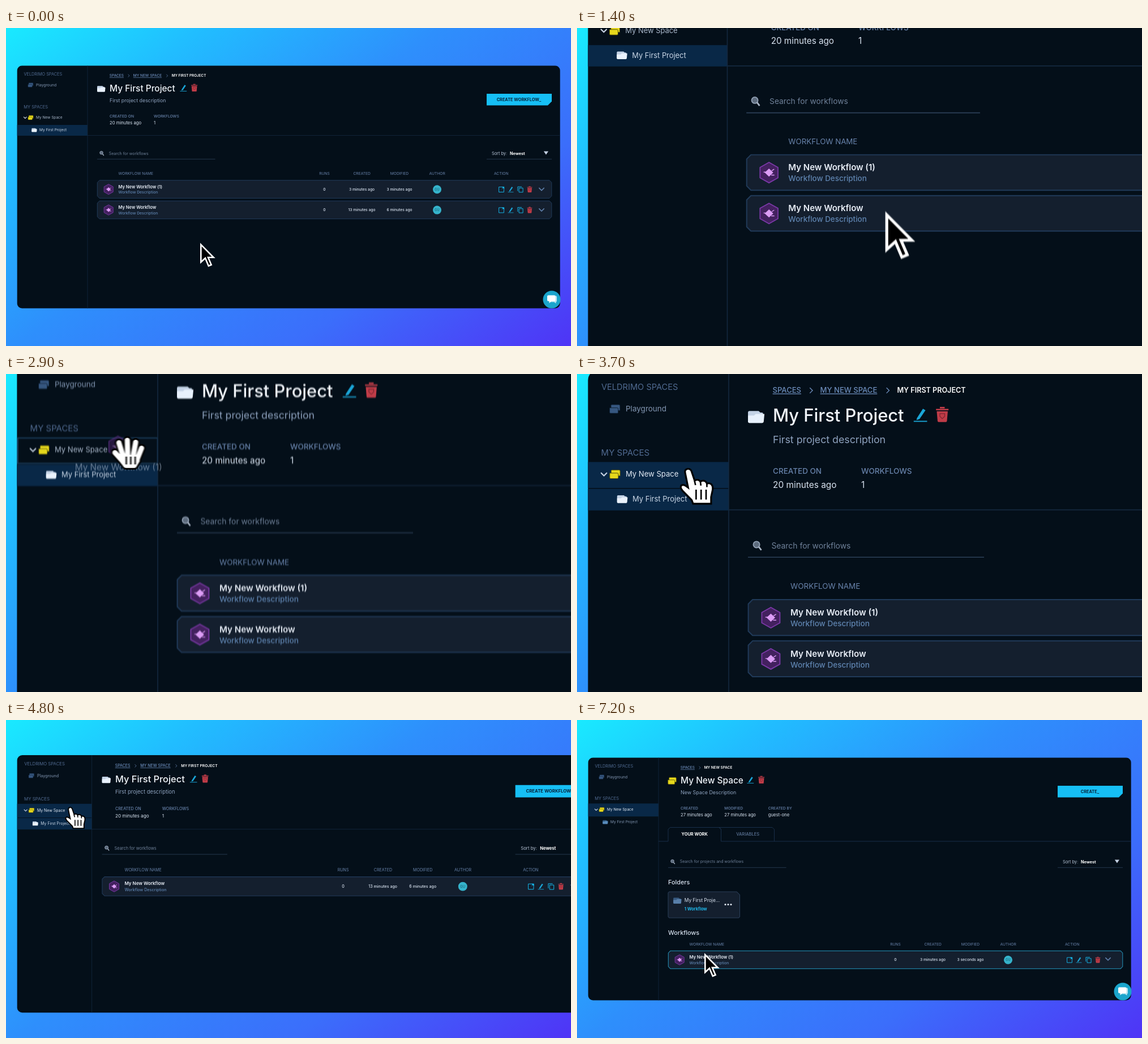
An HTML page that plays this animation: 998x561 px, repeating every 7.3 s.

```html
<!DOCTYPE html>
<html lang="en">
<head>
<meta charset="utf-8">
<title>Move a workflow</title>
<style>
html, body { margin: 0; width: 100%; height: 100%; overflow: hidden; background: #2e8ffd; }
svg { display: block; width: 998px; height: 561px; }
text { font-family: Inter, "Open Sans", sans-serif; white-space: pre; }
</style>
</head>
<body>
<svg id="stage" viewBox="0 0 998 561" xmlns="http://www.w3.org/2000/svg"></svg>
<script>
const LOOP = 7300, STEP = 100;
const LABEL = '#6883ab', SOFT = '#8fa3bf', LIGHT = '#d9e3f0', CYAN = '#16bff5', RED = '#c03c48', LINE = '#14283f';

// ---- drawing helpers; y is the middle of the capitals ----
const text = (x, y, size, fill, str, o = {}) =>
  `<text x="${x}" y="${(y + size * 0.36).toFixed(2)}" font-size="${size}" fill="${fill}" font-weight="${o.w || 400}"` +
  ` text-anchor="${o.a || 'start'}"${o.id ? ` id="${o.id}"` : ''}${o.u ? ' text-decoration="underline"' : ''}>${str}</text>`;
const path = (d, fill, stroke = 'none', w = 1, more = '') =>
  `<path d="${d}" fill="${fill}" stroke="${stroke}" stroke-width="${w}" ${more}/>`;
const rect = (x, y, w, h, fill, more = '') =>
  `<rect x="${x}" y="${y}" width="${w}" height="${h}" fill="${fill}" ${more}/>`;
const at = (x, y, body, k = 1, id = '') =>
  `<g${id ? ` id="${id}"` : ''} transform="translate(${x} ${y}) scale(${k})">${body}</g>`;
const group = (id, body) => `<g id="${id}">${body}</g>`;
const hline = (x1, x2, y, c = LINE) => path(`M${x1} ${y}H${x2}`, 'none', c, 0.8);

// ---- icons, centred on 0,0 ----
const stack = (c, edge) =>
  path('M-2.8 -3.8H3.6Q4.6 -3.8 4.6 -2.8V1.4H-3.4V-3.2Z', c, edge, 0.45) +
  path('M-4.6 -1H2Q3 -1 3 0V3Q3 3.8 2.2 3.8H-3.8Q-4.6 3.8 -4.6 3Z', c, edge, 0.45);
const folder = (back, front) =>
  path('M-4.6 -2.4Q-4.6 -3.3 -3.8 -3.3H1.4L2.4 -2.4H3.2Q4 -2.4 4 -1.6V3H-4.6Z', back) +
  path('M-4.6 -.7H-1.2L-.2 -1.6H4.7L4.3 2.7Q4.2 3.5 3.4 3.5H-3.8Q-4.6 3.5 -4.6 2.7Z', front);
const pencil =
  path('M-3 2.7L2.2 -5.4L4.4 -4L-.8 3.6L-3.4 4.4Z', '#1aa6d8') +
  path('M-5.8 5.5H5.8', 'none', '#1aa6d8', 0.9);
const trash =
  path('M-5.2 -4.2H5.2M-2 -5.8H2', 'none', RED, 1.2) +
  path('M-4.6 -2.8H4.6L3.9 5.4Q3.8 6.2 3 6.2H-3Q-3.8 6.2 -3.9 5.4Z', RED) +
  path('M-2 -.8H2V1.4L0 3.4L-2 1.4Z', 'none', '#7c2630', 0.6);
const openIcon =
  path('M1 -4.4H-4.4V4.6H4.4V-.6', 'none', CYAN, 0.9) + path('M1 -4.6H4.8V-.8ZM.8 -.8L2.8 -2.6', CYAN, CYAN, 0.6);
const copy =
  path('M-2.4 -2.6H4.6V4.8H-2.4Z', 'none', CYAN, 0.9, 'stroke-linejoin="round"') +
  path('M-4.6 2.8V-4.8H2.6', 'none', CYAN, 0.9);
const chevron = (c, w = 1.2) => path('M-2 -1L0 1L2 -1', 'none', c, w, 'stroke-linecap="round"');
const lens =
  '<circle cx="-.6" cy="-.8" r="2.5" fill="#5d6b7d" stroke="#93a2b6" stroke-width=".8"/>' +
  path('M1.2 1L3.2 3.6', 'none', '#aab6c6', 1.2);
const hexagon =
  path('M0 -9.1L8 -4.6V4.6L0 9.1L-8 4.6V-4.6Z', '#43215f', '#7c38a8', 0.9) +
  path('M0 -3.6L3.8 0L0 3.6L-3.8 0Z', '#dc9cf5') +
  path('M-4.8 -.4H-2M2 2.2H4.8M2.4 -1.6L4.6 -3', 'none', '#dc9cf5', 0.7);

// ---- page parts ----
const box = (x, y, w, h, c) =>
  `M${x + c} ${y}H${x + w - c}L${x + w} ${y + c}V${y + h - c}L${x + w - c} ${y + h}H${x + c}L${x} ${y + h - c}V${y + c}Z`;

function row(id, y, name, made, changed, dx = 0) {
  const small = { a: 'middle', w: 500 };
  return at(0, y,
    path(box(161.3, 0.2, 802.5, 31.6, 3.8), '#141f2e', '#203a59', 1, `id="${id}Edge" stroke-linejoin="round"`) +
    at(181.2, 16.1, hexagon) +
    text(198.5, 11.4, 7.56, '#e8eef7', name, { w: 600 }) +
    text(198.5, 21.3, 6.78, '#5f84b0', 'Workflow Description', { w: 500 }) +
    text(562.5, 16, 6.7, LIGHT, '0', small) +
    text(628.5, 16, 6.7, LIGHT, made, small) +
    text(695, 16, 6.7, LIGHT, changed, { ...small, id: id + 'Time' }) +
    '<circle cx="761.5" cy="16.2" r="7.5" fill="#35b3cb"/>' +
    text(761.5, 16.3, 5.6, '#14566a', 'GU', { a: 'middle' }) +
    at(875 + dx, 16.4, openIcon) + at(891.5 + dx, 16.2, pencil, 0.86) +
    at(908.5 + dx, 16.4, copy) + at(925 + dx, 16.2, trash, 0.86) +
    at(946 + dx * 1.6, 16 + dx * 0.25, chevron('#5d7ca6', 0.8), 2.1), 1, id);
}

const heads = y =>
  text(198.5, y, 6.72, LABEL, 'WORKFLOW NAME') +
  [[562.5, 'RUNS'], [628.7, 'CREATED'], [695, 'MODIFIED'], [761.7, 'AUTHOR'], [874.7, 'ACTION']]
    .map(([x, s]) => text(x, y, 6.7, LABEL, s, { a: 'middle' })).join('');

const tools = (y, hint) =>
  at(169.2, y, lens, 1.12) + text(181.7, y, 6.95, '#6f8199', hint) + hline(161, 369.5, y + 10.3, '#2c4058') +
  text(858, y, 7.35, '#b7c4d6', 'Sort by:') + text(890, y, 7.2, '#fff', 'Newest', { w: 700 }) +
  path(`M949.8 ${y - 3.4}H958L953.9 ${y + 2.6}Z`, '#c3d0e2') + hline(849, 964, y + 10.3, '#2c4058');

const crumb = (x, s) => text(x, 84, 6.52, '#6c8cba', s, { w: 500, u: true });
const sep = x => path(`M${x - 1.2} 81.8L${x + 1.2} 84.2L${x - 1.2} 86.6`, 'none', '#6c8cba', 0.7);
const meta = (x, label, value) =>
  text(x, 155.4, 6.75, LABEL, label, { w: 500 }) + text(x, 167.2, 7.7, LIGHT, value);
const title = (name, desc, x) =>
  text(183, 106, 15.43, '#f1f5fa', name, { w: 500 }) + text(183, 127.5, 8.88, SOFT, desc) +
  at(x, 105.8, pencil, 1.02) + at(x + 19.3, 105.5, trash, 1.06);
const button = label =>
  path('M849 116H964V129.5L957 136.5H849Z', CYAN) +
  text(906, 126.2, 7.35, '#06243c', label, { w: 700, a: 'middle' });

const sidebar =
  rect(19, 147.3, 125, 22.9, '#092847', 'id="spaceBg"') +
  rect(20.4, 147.6, 123.4, 22.4, 'none', 'id="dropEdge" stroke="#1c4263" stroke-width=".9"') +
  rect(19, 171, 125, 19, '#092847', 'id="projBg"') +
  path('M144 66V495', 'none', LINE, 0.8) +
  text(31.5, 81, 7.3, '#506a90', 'VELDRIMO SPACES') +
  at(43.4, 100.5, stack('#365780', '#0c1c2e')) + text(53, 100.3, 6.75, '#8296b2', 'Playground') +
  text(31.3, 138.8, 7.5, '#506a90', 'MY SPACES') +
  at(33.8, 158.2, chevron('#c7d3e3', 0.9), 1.2) + at(43.5, 158.1, stack('#e6d81c', '#4a4608')) +
  text(53, 158, 6.53, '#a9b7ca', 'My New Space', { id: 'spaceText' }) +
  group('projOpen', at(50, 180, folder('#c4d3e6', '#eaf2fc'))) +
  group('projShut', at(50, 180, folder('#2f577f', '#5a8dbd'))) +
  text(59, 180, 6.5, '#c9d6e6', 'My First Project', { id: 'projText' });

const projectPage =
  crumb(182.8, 'SPACES') + sep(216.8) + crumb(224.8, 'MY NEW SPACE') + sep(284.5) +
  text(292.7, 84, 6.32, '#fff', 'MY FIRST PROJECT', { w: 600 }) +
  at(168.2, 107.4, folder('#c4d3e6', '#e8f1fc'), 1.56) +
  title('My First Project', 'First project description', 313.3) +
  meta(183, 'CREATED ON', '20 minutes ago') + meta(261, 'WORKFLOWS', '1') +
  button('CREATE WORKFLOW_') + hline(144, 978.5, 189.5) +
  tools(221, 'Search for workflows') + heads(257) +
  row('copyRow', 268.5, 'My New Workflow (1)', '3 minutes ago', '3 minutes ago') +
  row('baseRow', 304.9, 'My New Workflow', '13 minutes ago', '6 minutes ago');

const spacePage =
  crumb(182.8, 'SPACES') + sep(216.8) + text(224.7, 84, 6.4, '#fff', 'MY NEW SPACE', { w: 600 }) +
  at(168, 107.3, stack('#e6d81c', '#4a4608'), 1.6) +
  title('My New Space', 'New Space Description', 306.3) +
  meta(183, 'CREATED', '27 minutes ago') + meta(260.3, 'MODIFIED', '27 minutes ago') +
  meta(337.8, 'CREATED BY', 'guest-one') + button('CREATE_') +
  path('M144 214H161V193L164.5 189.5H251L254.5 193V214H978.5M254.5 193L251 189.5H345L348.5 193V214', 'none', '#1b3350', 0.9) +
  text(207.7, 201.8, 7.4, '#fff', 'YOUR WORK', { w: 700, a: 'middle' }) +
  text(301.7, 201.8, 7.5, '#5d7699', 'VARIABLES', { w: 500, a: 'middle' }) +
  tools(250, 'Search for projects and workflows') +
  text(161, 286.6, 10.8, LIGHT, 'Folders', { w: 500 }) +
  path('M163 303H282L287.5 308.5V347L285.5 349H163L161 347V305Z', '#141f2e', '#2b3f59', 1) +
  at(177.3, 318.6, folder('#36597f', '#587fa9'), 1.55) +
  text(189.8, 318, 8.45, LIGHT, 'My First Proje...') +
  text(189.8, 333.6, 7.4, '#1fb6e8', '1 Workflow', { w: 700 }) +
  [262, 267, 272].map(x => `<circle cx="${x}" cy="325.6" r="1.5" fill="#e6edf6"/>`).join('') +
  text(161, 375.4, 10.8, LIGHT, 'Workflows', { w: 500 }) + heads(395.5) +
  row('moved', 407, 'My New Workflow (1)', '3 minutes ago', '1 second ago', -5);

const chat =
  '<circle cx="964" cy="479" r="15.5" fill="#1ba5cc"/>' +
  path('M960 472.5H971Q973 472.5 973 474.5V481Q973 483 971.5 483.5V486L968 483.5H960Z', '#b9e4f0') +
  path('M958 471.5H968.5Q970.5 471.5 970.5 473.5V480Q970.5 482 968.5 482H963L959.5 485.5V482H958Q956 482 956 480V473.5Q956 471.5 958 471.5Z', '#fff');

// ---- pointers ----
const arrow = path('M1.3 3.2V34L9 27L14.8 40.8L19.6 38.8L14 25.8H23.6Z', '#000', '#fff', 2.6);
const point =
  path('M-4 3.6Q-4.6 .6 -1.6 -.2Q1.4 -.6 2.5 2.4L5.6 11.6Q7 10.4 9 10.8Q10.8 11.4 11.3 12.6Q13.6 11 15.8 12Q17.4 13 17.8 14.6Q20 13.6 22 15Q24 16.6 23.6 20.6L22 28V34.6H4L2.6 31L-6.6 21.6Q-9.6 18 -7.6 16.2Q-5.4 14.8 -1 18.4Z', '#fff', '#000', 1.8) +
  path('M7 20.5V30.5M12 20.5V30.5M17 20.5V30.5M5.4 11.6L6.4 16M11.3 12.6L11.8 16.5M17.8 14.6V18', 'none', '#000', 1.5);
const fingers = 'M-9 -11L-4 5M-.5 -13.5L0 5M8 -11.5L5 5M14 -5.5L9 7M-13 -1L-4 9';
const palm = 'M-5 4H9.5V7L6.5 12H-2L-5 8Z';
const pass = (c, w) => path(fingers, 'none', c, w, 'stroke-linecap="round"') + path(palm, c, c, w, 'stroke-linejoin="round"');
const grab = pass('#000', 8.6) + pass('#fff', 5.2) + path('M-1.5 3V11M3 3V11M7.5 3V11', 'none', '#000', 1.5);

const blurDef = id =>
  `<filter id="${id}Blur" filterUnits="userSpaceOnUse" x="-60" y="-60" width="1118" height="681" color-interpolation-filters="sRGB"><feGaussianBlur id="${id}Dev" stdDeviation="0"/></filter>`;

document.getElementById('stage').innerHTML =
  `<defs><linearGradient id="sky" gradientUnits="userSpaceOnUse" x1="0" y1="0" x2="627" y2="838">
  <stop offset="0" stop-color="#19eaff"/><stop offset=".2" stop-color="#21bdff"/><stop offset=".44" stop-color="#2e8ffc"/>
  <stop offset=".72" stop-color="#3b6efb"/><stop offset="1" stop-color="#4f34f6"/></linearGradient>
  <clipPath id="frame"><rect x="19.7" y="66.5" width="959" height="428" rx="8.5"/></clipPath>${blurDef('scene')}${blurDef('mouse')}</defs>` +
  rect(0, 0, 998, 561, 'url(#sky)') +
  group('scene', group('cam', '<g clip-path="url(#frame)">' +
    rect(19, 66, 961, 430, '#040f19') + sidebar + group('project', projectPage) + group('space', spacePage) + '</g>' + chat +
    at(0, 0, `<g opacity=".55">${hexagon}</g><g opacity=".6">` +
      text(0.5, 18.2, 7.65, '#a9b8cb', 'My New Workflow (1)', { a: 'middle' }) + '</g>', 1, 'ghost'))) +
  group('mouse', group('cursor', group('arrow', arrow) + group('point', point) + group('grab', grab)));

// ---- motion ----
const $ = id => document.getElementById(id);
const show = (id, on) => $(id).setAttribute('display', on ? 'inline' : 'none');
const clamp = u => Math.max(0, Math.min(1, u));
const ramp = (t, a, b) => { const u = clamp((t - a) / (b - a)); return u * u * (3 - 2 * u); };
const mix = (a, b, u) => a + (b - a) * u;
const spring = ms => { const u = Math.max(0, ms) * 0.006; return 1 - (1 + u) * Math.exp(-u); };

const GRAB = 2050, DROP = 3600, MOVED = 4200, CLICK = 5200, OPEN = 5350;

const zoom = t => 1 + spring(t - 430) - spring(t - 4050);
const focus = t => 314.7 - 176.2 * spring(t - 2450);

// each leg: start, end, target
const legs = [[700, 1900, 250, 283], [GRAB, 3050, 109, 153.5], [6200, 6950, 225, 411]];
const mouse = t => legs.reduce((p, [a, b, x, y]) => {
  const u = ramp(t, a, b);
  return [mix(p[0], x, u), mix(p[1], y, u)];
}, [343, 379]);

const place = (t, [x, y]) => {
  const s = zoom(t);
  return [20 + (x - 20) * s, y * s - focus(t) * (s - 1)];
};

function blur(id, x, y) {
  const on = x > 0.2 || y > 0.2;
  if (on) {
    $(id + 'Dev').setAttribute('stdDeviation', `${x.toFixed(2)} ${y.toFixed(2)}`);
    $(id).setAttribute('filter', `url(#${id}Blur)`);
  } else $(id).removeAttribute('filter');
}

function draw(t) {
  const s = zoom(t), [mx, my] = mouse(t), before = t - 20;
  const drag = t >= GRAB && t < DROP, opened = t >= OPEN;

  $('cam').setAttribute('transform', `translate(${20 - 20 * s} ${-focus(t) * (s - 1)}) scale(${s})`);
  const dz = Math.abs(s - zoom(before)) * 50;
  const pan = Math.abs(focus(t) - focus(before)) * 50 * (s - 1);
  blur('scene', dz, pan * 0.005 + dz * 0.3);

  show('project', !opened);
  show('space', opened);
  show('copyRow', t < MOVED);
  $('baseRow').setAttribute('transform', `translate(0 ${t < MOVED ? 304.9 : 268.5})`);

  const hover = opened && my > 407;
  $('movedEdge').setAttribute('stroke', hover ? '#2596bd' : '#203a59');
  $('movedTime').textContent = t < 6100 ? '1 second ago' : t < 7100 ? '2 seconds ago' : '3 seconds ago';

  show('spaceBg', t >= DROP);
  show('dropEdge', drag && my > 147 && my < 170);
  show('projBg', !opened);
  show('projOpen', !opened);
  show('projShut', opened);
  $('spaceText').setAttribute('fill', t >= DROP ? '#e3ebf5' : '#a9b7ca');
  $('projText').setAttribute('fill', opened ? '#8397b3' : '#c9d6e6');

  show('ghost', drag);
  $('ghost').setAttribute('transform', `translate(${mx - 8.7} ${my - 6.2})`);

  const hand = t >= DROP && my < 190;
  show('grab', drag);
  show('point', hand);
  show('arrow', !drag && !hand);
  const press = ramp(t, 1900, GRAB) - ramp(t, 3650, 3900) +
    ramp(t, CLICK - 100, CLICK) - ramp(t, CLICK + 100, CLICK + 300);
  const [px, py] = place(t, [mx, my]), [qx, qy] = place(before, mouse(before));
  $('cursor').setAttribute('transform', `translate(${px} ${py}) scale(${s * (1 - 0.13 * press)})`);
  blur('mouse', Math.min(3, Math.abs(px - qx) * 0.2), Math.min(3, Math.abs(py - qy) * 0.2));
}

const start = performance.now();
let last = -1;
function tick() {
  const t = Math.floor(((performance.now() - start) % LOOP) / STEP) * STEP;
  if (t !== last) draw(last = t);
  requestAnimationFrame(tick);
}
tick();
</script>
</body>
</html>
```
